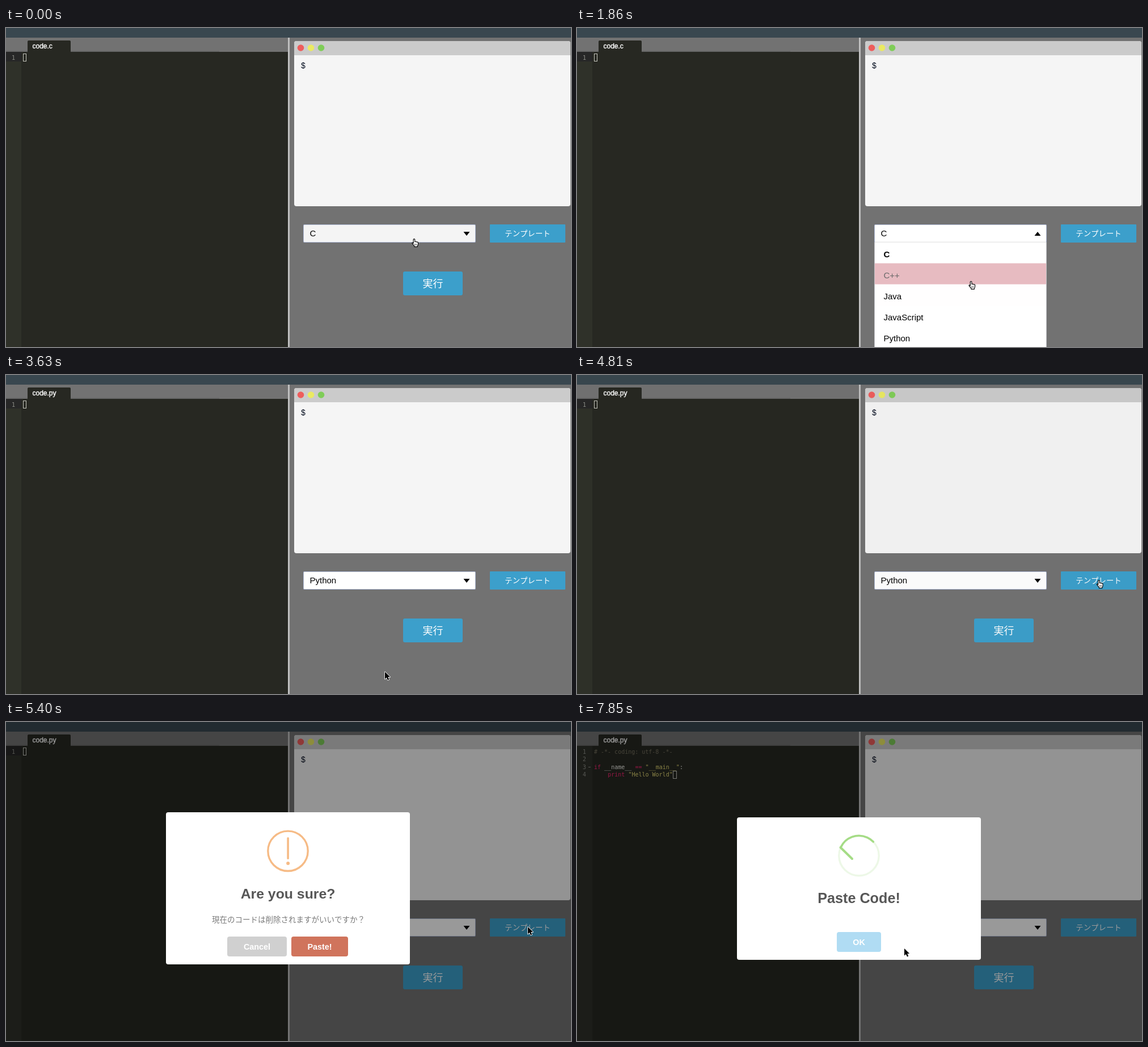
Write an HTML page with a canvas that moves like this. It is 996 px wide and 562 px high and loops after 8000 ms.

```html
<!DOCTYPE html>
<html lang="ja">
<head>
<meta charset="utf-8">
<title>Web editor</title>
<style>
html, body { margin: 0; width: 100%; height: 100%; overflow: hidden; background: #727272; }
canvas { display: block; }
</style>
</head>
<body>
<canvas id="stage" width="996" height="562"></canvas>
<script>
const ctx = document.getElementById('stage').getContext('2d');
const LOOP = 8000;
const SANS = '"Liberation Sans", Arial, sans-serif';
const MONO = '"DejaVu Sans Mono", monospace';
const CJK = '"Noto Sans CJK JP", "Noto Sans CJK", sans-serif';
const GREEN = '#a5dc86';

const clamp = v => Math.max(0, Math.min(1, v));
const lerp = (a, b, p) => a + (b - a) * p;

// Latest entry [time, ...values] that has begun, or null
const stepAt = (list, t) => list.filter(s => s[0] <= t).pop() || null;

function box(x, y, w, h, color, r = 0) {
  ctx.fillStyle = color;
  ctx.beginPath();
  ctx.roundRect(x, y, w, h, r);
  ctx.fill();
}

function text(str, x, y, font, color, align = 'left') {
  ctx.font = font;
  ctx.fillStyle = color;
  ctx.textAlign = align;
  ctx.fillText(str, x, y);
}

function disc(x, y, r, color) {
  ctx.fillStyle = color;
  ctx.beginPath();
  ctx.arc(x, y, r, 0, Math.PI * 2);
  ctx.fill();
}

function ring(x, y, r, width, color, from = 0, to = 360) {
  ctx.strokeStyle = color;
  ctx.lineWidth = width;
  ctx.beginPath();
  ctx.arc(x, y, r, from * Math.PI / 180, to * Math.PI / 180);
  ctx.stroke();
}

function line(x1, y1, x2, y2, width, color) {
  ctx.strokeStyle = color;
  ctx.lineWidth = width;
  ctx.beginPath();
  ctx.moveTo(x1, y1);
  ctx.lineTo(x2, y2);
  ctx.stroke();
}

function outline(x, y, w, h, color) {
  ctx.strokeStyle = color;
  ctx.lineWidth = 1;
  ctx.strokeRect(x + .5, y + .5, w - 1, h - 1);
}

// ---- editor ----
const PICK = 3040, PASTE = 7340;
const CODE = [
  [[0, '# -*- coding: utf-8 -*-', '#75715e']],
  [],
  [[0, 'if', '#f92672'], [3, '__name__', '#f8f8f2'], [12, '==', '#f92672'],
   [15, '"__main__"', '#e6db74'], [25, ':', '#f8f8f2']],
  [[4, 'print', '#f92672'], [10, '"Hello World"', '#e6db74']]
];

function drawEditor(t) {
  box(0, 0, 996, 562, '#727272');
  box(0, 0, 996, 17, '#39474f');
  box(0, 40, 376, 2, '#686868');
  box(0, 42, 497, 520, '#272822');
  box(0, 42, 27, 520, '#2f3129');
  box(497, 17, 3, 545, '#bfbfbf');
  box(38, 22, 76, 21, '#272822', [2, 2, 0, 0]);
  const name = t < PICK ? 'code.c' : 'code.py';
  text(name, 46.5, 36, '12px ' + SANS, '#fff');
  ctx.strokeStyle = '#fff';
  ctx.lineWidth = .4;
  ctx.strokeText(name, 46.5, 36);

  const pasted = t >= PASTE;
  const font = '10px ' + MONO;
  if (!pasted) box(0, 42, 27, 17, '#272727');
  if (t >= 4900 && t < 5220) box(27, 44, 470, 15, '#202020');
  (pasted ? CODE : [[]]).forEach((row, i) => {
    const y = 56 + i * 13.4;
    text(i + 1, 16, y, font, '#8f908a', 'right');
    for (const [col, str, color] of row) text(str, 30 + col * 6.04, y, font, color);
  });
  if (pasted) {
    box(20, 79, 4, 1, '#8f908a');
    outline(169, 86, 7, 14, '#c8c8c0');
  } else {
    outline(30, 45, 6, 14, '#c8c8c0');
  }
}

// ---- right side ----
function drawPanel() {
  box(508, 23, 487, 291, '#f5f5f5', 4);
  box(508, 23, 487, 25, '#cbcbcb', [4, 4, 0, 0]);
  ['#ee5d5c', '#eaea62', '#7fcd58'].forEach((c, i) => disc(519.5 + i * 18, 35, 5.8, c));
  text('$', 520, 71, '14px ' + SANS, '#000a1c');
  box(853, 346, 133, 32, '#3c9fcb', 1);
  text('テンプレート', 919.5, 367, '500 13.4px ' + CJK, '#fff', 'center');
  box(700, 429, 105, 42, '#3c9fcb', 3);
  text('実行', 752.5, 457, '500 18px ' + CJK, '#fff', 'center');
}

// label, hover start, hover end
const OPTIONS = [
  ['C', 1690, 1740], ['C++', 1750, 1800], ['Java', 1860, 1916],
  ['JavaScript', 1916, 2077], ['Python', 2077, 9000]
];
const HOVER = 120;
const OPENING = [[800, .5], [860, 1], [3040, .8], [3115, .45], [3190, .15], [3270, 0]];

function drawSelect(t) {
  const shown = (stepAt(OPENING, t) || [0, 0])[1];
  const open = t >= 800 && t < PICK;
  if (shown) {
    const k = lerp(.75, 1, shown);
    ctx.save();
    ctx.globalAlpha = shown;
    ctx.translate(676, 377 - 21 * (1 - shown));
    ctx.scale(k, k);
    ctx.translate(-676, -377);
    box(524, 377, 304, 400, '#bfbfc4');
    box(525, 377, 302, 399, '#fff');
    OPTIONS.forEach(([label, from, to], i) => {
      const y = 377 + i * 37;
      const heat = clamp((t - from) / HOVER) - clamp((t - to) / HOVER);
      if (heat > 0) box(525, y + .5, 302, 37, `rgba(197,91,106,${heat})`);
      const v = Math.round(255 * Math.max(0, heat));
      text(label, 540.5, y + 27, (i ? '' : 'bold ') + '15px ' + SANS, `rgb(${v},${v},${v})`);
    });
    ctx.restore();
  }
  box(524, 346, 304, 32, '#aab5d0', 2);
  box(525, 347, 302, 30, t < 800 ? '#f4f4f4' : '#fff', 1);
  if (open) box(525, 376.5, 302, 1.5, '#e9e9e9');
  text(t < PICK ? 'C' : 'Python', 535.5, 367, '15px ' + SANS, '#000');
  const [base, tip] = open ? [366, 359] : [359, 366];
  ctx.fillStyle = '#000';
  ctx.beginPath();
  ctx.moveTo(806.5, base);
  ctx.lineTo(817.5, base);
  ctx.lineTo(812, tip);
  ctx.fill();
}

// ---- dialogs ----
// time, shade, scale, green channel of the icon
const POP = [
  [4810, .02, 0, 212], [4900, .07, .7, 212], [4980, .16, .79, 212], [5040, .33, 1.04, 206],
  [5220, .4, .98, 198], [5400, .4, 1, 187], [6860, .4, 1, 204]
];

function button(x, y, w, label, color) {
  box(x, y, w, 35, color, 4);
  text(label, x + w / 2, y + 23, 'bold 14.4px ' + SANS, '#fff', 'center');
}

function drawWarning(t, green) {
  const color = `rgb(246,${green},134)`;
  box(282, 159, 430, 268, '#fff', 4);
  ring(497, 227.3, 35.2, 3.4, color);
  box(495.3, 203, 3.6, 39, color, 1.8);
  disc(497.1, 249, 3, color);
  text('Are you sure?', 497, 311, 'bold 24.8px ' + SANS, '#575757', 'center');
  text('現在のコードは削除されますがいいですか？', 498, 353, '13.5px ' + CJK, '#797979', 'center');
  button(390, 378, 105, 'Cancel', '#d0d0d0');
  button(503, 378, 100, 'Paste!', t >= 7220 ? '#c0644f' : '#d0745c');
}

function drawSuccess(t) {
  box(282, 168, 430, 251, '#fff', 4);
  const full = t >= 7640;
  ring(497, 235.5, 35.2, 3.4, 'rgba(165,220,134,.2)', full ? 0 : -155, full ? 360 : 57);
  ctx.lineCap = 'round';
  if (t >= 7850) {
    ring(497, 235.5, 35.2, 3.6, GREEN, -155, -44);
    line(464.5, 221, 485, 241, 4, GREEN);
  } else if (t >= 7790) {
    ring(497, 235.5, 35.2, 3.6, GREEN, -135, 25);
  }
  ctx.lineCap = 'butt';
  text('Paste Code!', 497, 319, 'bold 25.2px ' + SANS, '#575757', 'center');
  button(458, 370, 78, 'OK', '#b0dcf3');
}

function drawDialog(t) {
  const pop = stepAt(POP, t);
  if (!pop) return;
  const [, shade, k, green] = pop;
  box(0, 0, 996, 562, `rgba(0,0,0,${shade})`);
  if (!k) return;
  ctx.save();
  ctx.translate(497, 293);
  ctx.scale(k, k);
  ctx.translate(-497, -293);
  if (t < PASTE) drawWarning(t, green);
  else drawSuccess(t);
  ctx.restore();
}

// ---- pointer ----
const MOVES = [
  { start: 1690, step: 58, keys: [[1640, 719.5, 371], [1860, 686.5, 470], [2270, 650.5, 541]] },
  { start: 3630, step: 63.3, keys: [[3570, 650, 541], [3630, 668, 523], [4090, 898, 351], [4390, 920, 361]] },
  { start: 5630, step: 59, keys: [[5580, 920, 361], [6120, 546, 394], [6340, 577, 399]] }
];
const HAND = new Path2D('M3.2 8.4V1.9a1.3 1.3 0 0 1 2.6 0V5.6q1.2-.8 2 .2 1.2-.6 1.9.4 1.8-.4 1.8 1.2V9.6q0 2-1.2 3.6V14.4H4.8V13Q3 11 .9 8.2 .7 6.6 2.2 7.2Z');
const ARROW = new Path2D('M0 0V12.6L2.9 9.9 5 14.5 7.2 13.5 5.2 9.1H9.1Z');

function pointerAt(t) {
  const move = MOVES.filter(m => t >= m.start).pop();
  if (!move) return MOVES[0].keys[0].slice(1);
  const { start, step, keys } = move;
  const time = start + Math.floor((t - start) / step + .02) * step;
  const last = keys.length - 1;
  if (t >= keys[last][0]) return keys[last].slice(1);
  let i = 0;
  while (i < last - 1 && time >= keys[i + 1][0]) i++;
  const [a, b] = [keys[i], keys[i + 1]];
  let p = clamp((time - a[0]) / (b[0] - a[0]));
  if (i === last - 1) p = 1 - (1 - p) ** 2;
  return [lerp(a[1], b[1], p), lerp(a[2], b[2], p)];
}

function drawPointer(t) {
  const [x, y] = pointerAt(t);
  const inside = (l, top, r, bottom) => x > l && x < r && y > top && y < bottom;
  const hand = t < 3270
    || (t < 4900 && inside(853, 346, 986, 378))
    || (t > 5630 && t < PASTE && inside(390, 378, 603, 413));
  ctx.save();
  ctx.lineJoin = 'round';
  if (hand) {
    ctx.translate(x - 4.5, y);
    ctx.fillStyle = '#fff';
    ctx.strokeStyle = '#000';
    ctx.lineWidth = 1.1;
    ctx.fill(HAND);
    ctx.stroke(HAND);
    for (const fx of [5.5, 7.2, 8.9]) line(fx, 9, fx, 12, .7, '#333');
  } else {
    ctx.translate(x, y);
    ctx.strokeStyle = '#fff';
    ctx.lineWidth = 1.6;
    ctx.stroke(ARROW);
    ctx.fillStyle = '#000';
    ctx.fill(ARROW);
  }
  ctx.restore();
}

const origin = performance.now();
function frame(now) {
  const t = Math.max(0, now - origin) % LOOP;
  drawEditor(t);
  drawPanel();
  drawSelect(t);
  drawDialog(t);
  drawPointer(t);
  requestAnimationFrame(frame);
}
frame(origin);
</script>
</body>
</html>
```
